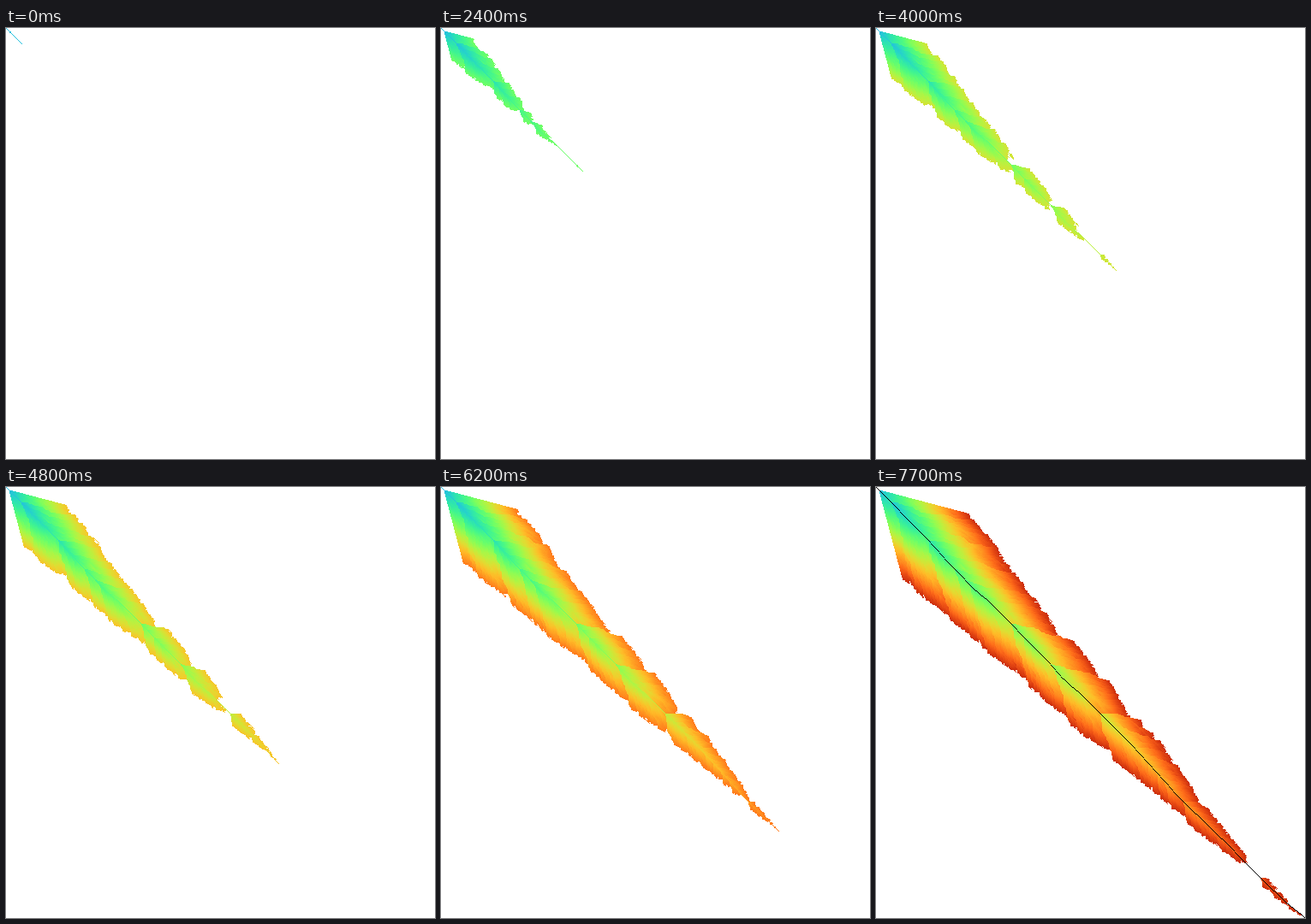
Recreate the animation shown at these times as an HTML page with a canvas. Size 501 px wide and 504 px high, loop 8 s.

```html
<!DOCTYPE html>
<html lang="en">
<head>
<meta charset="utf-8">
<title>Edit distance search</title>
<style>
  html, body { margin: 0; width: 100%; height: 100%; overflow: hidden; background: #fff; }
  canvas { display: block; }
</style>
</head>
<body>
<canvas id="stage" width="501" height="504"></canvas>
<script>
const W = 501, H = 504, STEP = 100, LOOP = 8000, LAST = 77, UNSEEN = 255;

// Key points of the best alignment: cost, column reached, diagonal (y - x).
// Steep stretches are long runs of matching letters.
const keys = [
  [0, 4, 0], [1, 18, 0], [8, 42, 1], [9, 61, 1], [15, 80, 3], [17, 104, 4], [19, 113, 5],
  [23, 128, 3], [24, 158, 2], [27, 180, 3], [28, 204, 3], [33, 219, 6], [36, 235, 4],
  [37, 262, 3], [46, 303, 3], [55, 347, 8], [56, 359, 9], [68, 419, 7], [69, 449, 8],
  [73, 481, 7], [LAST, 500, 3]
];

function alignment(cost, field) {
  const i = Math.max(1, keys.findIndex(key => key[0] >= cost));
  const from = keys[i - 1], to = keys[i];
  const part = (cost - from[0]) / (to[0] - from[0]);
  return Math.round(from[field] + part * (to[field] - from[field]));
}

// Furthest column for each cost, and the alignment's diagonal in each column.
const tips = [], lane = [];
for (let cost = 0; cost <= LAST; cost++) {
  tips.push(alignment(cost, 1));
  while (lane.length < tips[cost]) lane.push(alignment(cost, 2));
}
lane.push(lane[W - 2]);

let seed = 20231;
function random() {
  seed = (Math.imul(seed, 1664525) + 1013904223) >>> 0;
  return seed / 4294967296;
}
const letters = length => Array.from({ length }, () => Math.floor(random() * 4));
const rowText = letters(W), columnText = letters(H);

function matches(x, y) {
  const k = y - x;
  if (k === lane[x]) return true;
  const near = Math.min(x, y), edge = Math.floor(4 + 0.36 * Math.abs(k));
  return near < edge || (near > edge && rowText[x] === columnText[y]);
}

// Breadth-first search by cost; matching letters are followed greedily.
const costs = new Uint8Array(W * H).fill(UNSEEN);
let front = [[0, 0]];
for (let cost = 0; cost <= LAST; cost++) {
  const next = [];
  for (let [x, y] of front) {
    while (x < W && y < H && costs[y * W + x] === UNSEEN) {
      costs[y * W + x] = cost;
      if (x >= tips[cost] || !matches(x, y)) {
        next.push([x + 1, y + 1], [x + 1, y], [x, y + 1]);
        break;
      }
      x++;
      y++;
    }
  }
  front = next;
}

// Polynomial form of the Turbo colour map.
function turbo(t) {
  return [
    34.61 + t * (1172.33 - t * (10793.56 - t * (33300.12 - t * (38394.49 - t * 14825.05)))),
    23.31 + t * (557.33 + t * (1225.33 - t * (3574.96 - t * (1073.77 + t * 707.56)))),
    27.2 + t * (3211.1 - t * (15327.97 - t * (27814 - t * (22569.18 - t * 6838.66))))
  ];
}
const colours = tips.map((_, cost) => turbo(0.25 + 0.0081 * cost));

const ctx = document.getElementById("stage").getContext("2d");
const image = ctx.createImageData(W, H);

function paint(index, [r, g, b]) {
  image.data.set([r, g, b, 255], index * 4);
}

function draw(step) {
  const limit = Math.min(step + 1, LAST);
  image.data.fill(255);
  costs.forEach((cost, i) => {
    if (cost <= limit) paint(i, colours[cost]);
  });
  if (step === LAST) lane.forEach((k, x) => paint((x + k) * W + x, [0, 0, 0]));
  ctx.putImageData(image, 0, 0);
}

let shown = -1;
const start = performance.now();
function tick() {
  const time = (performance.now() - start) % LOOP;
  const step = Math.min(LAST, Math.floor(time / STEP));
  if (step !== shown) draw(shown = step);
  requestAnimationFrame(tick);
}
tick();
</script>
</body>
</html>
```
